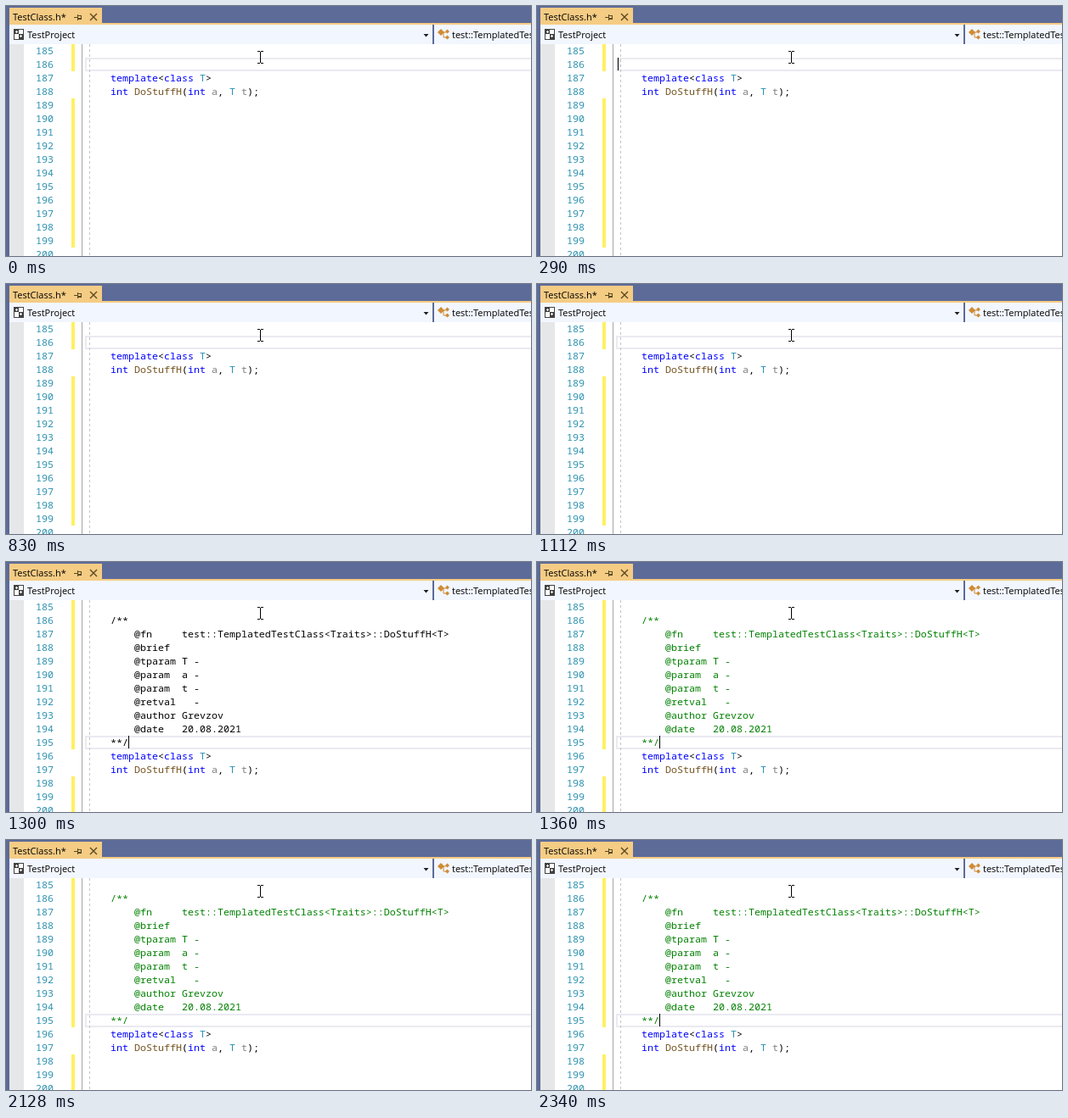
Recreate the animation shown at these times as an HTML page. Size 618 by 295 pixels, loop 2550 ms.

```html
<!DOCTYPE html>
<html lang="en">
<head>
<meta charset="utf-8">
<title>Comment generator in a code editor</title>
<style>
  html, body { margin: 0; width: 100%; height: 100%; overflow: hidden; background: #fff; }
  svg { display: block; width: 618px; height: 295px; shape-rendering: crispEdges; }
  text { white-space: pre; }
  .ui { font: 11px "Open Sans", "Noto Sans", sans-serif; fill: #000; }
  .code { font: 11.667px "Noto Sans Mono", "DejaVu Sans Mono", monospace; }
  .num { fill: #2b91af; }
  .key { fill: #00f; }
  .type { fill: #2b91af; }
  .func { fill: #74531f; }
  .arg { fill: #808080; }
  .changed { fill: #fff062; }
  .current { fill: none; stroke: #eaeaf2; stroke-width: 2; }
  .smooth { shape-rendering: auto; }

  .before, .after, .caret, .doc { animation: 2550ms step-end infinite; }
  .before { animation-name: before; }
  .after { animation-name: after; }
  .before .caret { animation-name: caret-before; }
  .after .caret { animation-name: caret-after; }
  .doc { animation-name: colorize; }

  @keyframes before { 0% { opacity: 1; } 50.9804%, 100% { opacity: 0; } }
  @keyframes after { 0% { opacity: 0; } 50.9804%, 100% { opacity: 1; } }
  @keyframes caret-before {
    0% { opacity: 0; } 11.3725% { opacity: 1; } 32.549%, 100% { opacity: 0; }
  }
  @keyframes caret-after {
    0% { opacity: 1; } 70.9804% { opacity: 0; } 91.7647%, 100% { opacity: 1; }
  }
  @keyframes colorize { 0% { fill: #000; } 53.3333%, 100% { fill: #008000; } }
</style>
</head>
<body>
<svg viewBox="0 0 618 295">
  <rect width="618" height="295" fill="#fff"/>
  <rect y="44" width="21" height="251" fill="#e6e7e8"/>

  <g id="numbers" class="code num"></g>
  <g id="before" class="before"></g>
  <g id="after" class="after"></g>

  <path d="M89.5 45V295" stroke="#a5a5a5"/>
  <path d="M98.5 45V295" stroke="#c4c4c4" stroke-dasharray="3 3"/>

  <!-- tab strip and window edge -->
  <path d="M0 0H618V23H4V295H0z" fill="#5d6b99"/>
  <path d="M4 2H113V20H618V22H4z" fill="#f5cc84"/>
  <text class="ui" x="8" y="17">TestClass.h*</text>
  <path d="M80 13.5h4M84.5 10v7M85 11.5h4M85 14.5h4M85 15.5h4M88.5 11v5" fill="none" stroke="#5b4a20"/>
  <path class="smooth" d="M99 9l8 8M107 9l-8 8" stroke="#5b4a20" stroke-width="1.4"/>

  <!-- navigation bar -->
  <rect x="4" y="22" width="614" height="23" fill="#f2f6fe"/>
  <rect x="502" y="22" width="2" height="23" fill="#5d6b99"/>
  <path class="smooth" d="M491.5 33h6l-3 3.5z" fill="#1e1e1e"/>
  <rect x="9.5" y="27.5" width="11" height="12" fill="#fff" stroke="#424242"/>
  <path d="M10 28h5v5h-5zM15 33h5v6h-5z" fill="#424242"/>
  <path d="M11 30.500h3M12.500 29v3M16 35.500h3M17.500 34v3" stroke="#fff"/>
  <text class="ui" x="25" y="38">TestProject</text>
  <g class="smooth" fill="#d08b35">
    <path d="M508 31l4-4 4 4-4 4zM517 30l2.500-2.500 2.500 2.500-2.500 2.500zM517 37l2.500-2.500 2.500 2.500-2.500 2.500z"/>
    <path d="M514 31h4M515 31v6h3" fill="none" stroke="#d08b35"/>
  </g>
  <text class="ui" x="525" y="38">test::TemplatedTestClass</text>

  <!-- mouse pointer -->
  <path d="M296 53.5h3M300 53.5h3M299.5 54v13M296 67.500h3M300 67.500h3" fill="none" stroke="#000"/>
</svg>
<script>
  const FIRST = 185, ROW = 16, TOP = 45, LEFT = 95, CHAR = 7;
  const rowTop = line => TOP + (line - FIRST) * ROW;
  const span = (kind, s) => `<tspan class="${kind}">${s}</tspan>`;
  const escapeText = s => s.replace(/</g, "&lt;").replace(/>/g, "&gt;");
  const textAt = (line, column, content) =>
    `<text x="${LEFT + column * CHAR}" y="${rowTop(line) + 12}">${content}</text>`;
  const changed = (from, to) =>
    `<rect class="changed" x="77" y="${rowTop(from)}" width="4" height="${(to - from + 1) * ROW}"/>`;
  const current = (line, column) =>
    `<rect class="current" x="94" y="${rowTop(line) + 1}" width="540" height="14"/>
     <rect class="caret" x="${LEFT + column * CHAR}" y="${rowTop(line)}" width="1" height="15"/>`;

  const declaration = line => `<g class="code">` +
    textAt(line, 4, span("key", "template") + "&lt;" + span("key", "class") + " " + span("type", "T") + "&gt;") +
    textAt(line + 1, 4, span("key", "int") + " " + span("func", "DoStuffH") + "(" + span("key", "int") + " " +
      span("arg", "a") + ", " + span("type", "T") + " " + span("arg", "t") + ");") + `</g>`;

  const tags = [
    ["@fn", "test::TemplatedTestClass<Traits>::DoStuffH<T>"],
    ["@brief", ""],
    ["@tparam", "T -"],
    ["@param", "a -"],
    ["@param", "t -"],
    ["@retval", "  -"],
    ["@author", "Grevzov"],
    ["@date", "20.08.2021"]
  ];
  const doc = `<g class="code doc">` + textAt(186, 4, "/**") +
    tags.map(([tag, value], i) => textAt(187 + i, 8, tag.padEnd(8) + escapeText(value))).join("") +
    textAt(195, 4, "**/") + `</g>`;

  const fill = (id, content) => document.getElementById(id).innerHTML = content;
  fill("numbers", Array.from({ length: 16 }, (_, i) =>
    `<text x="35" y="${rowTop(FIRST + i) + 12}">${FIRST + i}</text>`).join(""));
  fill("before", changed(185, 186) + changed(189, 199) + current(186, 0) + declaration(187));
  fill("after", changed(185, 195) + changed(198, 200) + current(195, 7) + doc + declaration(196));
</script>
</body>
</html>
```
